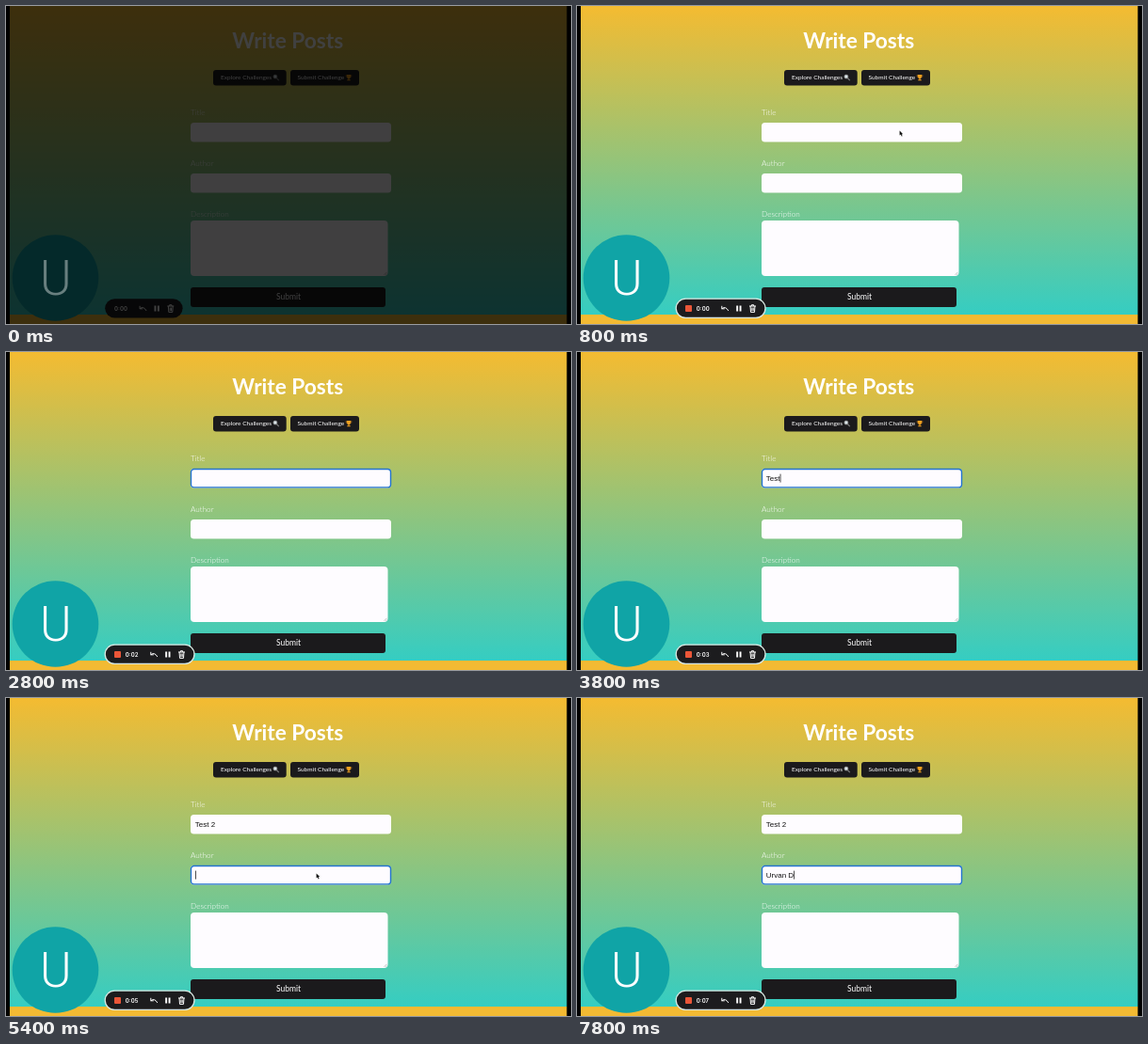
An HTML page for the animation above (8000 ms loop, 600 px wide and 338 px high).

```html
<!DOCTYPE html>
<html lang="en">
<head>
<meta charset="utf-8">
<title>Write Posts</title>
<style>
  html, body { margin: 0; width: 100%; height: 100%; overflow: hidden; background: #000; }
  svg { display: block; width: 100vw; height: 100vh; }
  text { font-family: Lato, sans-serif; fill: #fff; }
  .heading { font-size: 22.7px; font-weight: 700; text-anchor: middle; }
  .label { font-size: 8.2px; font-weight: 300; }
  .link { font-size: 6.5px; }
  .submit { font-size: 8.5px; text-anchor: middle; }
  .initial { font: 300 51px Roboto, sans-serif; text-anchor: middle; }
  .timer { font: 600 6px Inter, sans-serif; }
  .typed { font: 8px "Liberation Sans", Arial, sans-serif; fill: #111; white-space: pre; }
  .button { fill: #1b1a1c; }
  .field { fill: #fefcff; }
  .ring { fill: none; stroke: #2272cf; stroke-width: 1.4; }
  .line { fill: none; stroke: #fff; stroke-width: 1; stroke-linecap: round; stroke-linejoin: round; }
</style>
</head>
<body>
<svg viewBox="0 0 600 338" preserveAspectRatio="none">
  <defs>
    <linearGradient id="sky" x2="0" y2="1">
      <stop stop-color="#f4bb31"/>
      <stop offset="1" stop-color="#35cdc2"/>
    </linearGradient>
  </defs>
  <rect width="600" height="338"/>
  <rect x="4" width="591.5" height="328" fill="url(#sky)"/>
  <rect x="4" y="328" width="591.5" height="10" fill="#f3ba33"/>

  <text class="heading" x="299.3" y="45">Write Posts</text>

  <rect class="button" x="220" y="68" width="77.7" height="16.5" rx="3"/>
  <text class="link" x="228" y="78.3">Explore Challenges</text>
  <path d="M287.3 76.5l2.5 2.6" stroke="#777" stroke-width="1.3"/>
  <circle cx="285.9" cy="75.1" r="2" fill="#dce6ea" stroke="#8d8d8d" stroke-width=".7"/>

  <rect class="button" x="302" y="68" width="73" height="16.5" rx="3"/>
  <text class="link" x="309.5" y="78.3">Submit Challenge</text>
  <path d="M362 73h4v2q0 1.8-1.5 2.2v1h1.2v1h-3.4v-1h1.2v-1q-1.5-.4-1.5-2.2z" fill="#f0a020"/>
  <path d="M362 73.7h-1q0 2 1.5 2.2M366 73.7h1q0 2-1.5 2.2" fill="none" stroke="#d98a1c" stroke-width=".6"/>

  <text class="label" x="196" y="116.3">Title</text>
  <text class="label" x="196" y="170.3">Author</text>
  <text class="label" x="196" y="224.3">Description</text>

  <g id="title" transform="translate(196 124)"></g>
  <g id="author" transform="translate(196 178)"></g>

  <rect class="field" x="196" y="228" width="209.5" height="59" rx="4"/>
  <path d="M401.5 285.8l3-3M403.3 285.8l1.2-1.2" stroke="#888" stroke-width=".5"/>

  <rect class="button" x="196" y="299" width="207" height="21" rx="3"/>
  <text class="submit" x="300" y="312.4">Submit</text>

  <circle cx="52.5" cy="289" r="45.8" fill="#10a4a6"/>

  <rect id="bar" x="105.2" y="311.2" height="20.2" rx="10.1" fill="#1c1c1e" stroke="#d9e8e2"/>
  <rect id="record" x="115" y="318" width="7" height="7" rx="1" fill="#ea5638"/>
  <g id="tools">
    <text class="timer" id="timer" x="126.8" y="323.8"></text>
    <path class="line" d="M153.8 319.2v2.6h2.6M154 321.6q3.5-3.2 6.6 2"/>
    <path d="M169.2 318.6h1.9v6h-1.9zM172.6 318.6h1.9v6h-1.9z" fill="#fff"/>
    <path class="line" d="M183.4 319h6.2M185.4 318.6v-.9h2.2v.9M184.1 319.2l.4 6.2h4l.4-6.2M185.9 321v2.7M187.2 321v2.7" stroke-width=".9"/>
  </g>

  <rect id="shade" width="600" height="338" opacity=".75"/>
  <text class="initial" id="initial" x="52.8" y="307">U</text>
  <path id="pointer" d="M0 0v5l1.2-1 .9 2 .9-.4-.9-1.9h1.5z" fill="#111" stroke="#fff" stroke-width=".6" paint-order="stroke"/>
</svg>
<script>
const LOOP = 8000, STEP = 200, BRIGHT_AT = 800;
const $ = id => document.getElementById(id);
const show = (el, on) => el.setAttribute("visibility", on ? "visible" : "hidden");

// Each key time reveals one more character.
const fields = [
  { id: "title", text: "Test 2", focus: 2000, blur: 5400, keys: [3000, 3200, 3400, 3600, 4000, 4400] },
  { id: "author", text: "Urvan D", focus: 5400, blur: LOOP, keys: [6000, 6200, 6400, 6600, 6800, 7000, 7400] }
];

for (const field of fields) {
  const group = $(field.id);
  group.innerHTML = `
    <rect class="field" width="213" height="20.4" rx="3.5"/>
    <rect class="ring" x=".5" y=".5" width="212" height="19.4" rx="3.2"/>
    <text class="typed" x="4.8" y="13"></text>
    <rect class="caret" y="5.6" width=".7" height="9"/>`;
  field.ring = group.querySelector(".ring");
  field.typed = group.querySelector(".typed");
  field.caret = group.querySelector(".caret");
}

function drawField(field, t) {
  const pressed = field.keys.filter(key => key <= t);
  const focused = t >= field.focus && t < field.blur;
  const lastEvent = pressed.length ? pressed[pressed.length - 1] : field.focus;
  const caretOn = focused && Math.floor((t - lastEvent) / 500) % 2 === 0;
  field.typed.textContent = field.text.slice(0, pressed.length);
  const width = pressed.length ? field.typed.getComputedTextLength() : 0;
  field.caret.setAttribute("x", 5 + width);
  show(field.ring, focused);
  show(field.caret, caretOn);
}

// Pointer stops: time, x, y
const stops = [[0, 342.6, 132.6], [4400, 342.6, 132.6], [4800, 330.7, 177.5], [5200, 329.6, 186.4], [LOOP, 329.6, 186.4]];

function drawPointer(t) {
  const i = stops.findIndex(stop => stop[0] > t);
  const [t0, x0, y0] = stops[i - 1], [t1, x1, y1] = stops[i];
  const k = (t - t0) / (t1 - t0);
  $("pointer").setAttribute("transform", `translate(${x0 + (x1 - x0) * k} ${y0 + (y1 - y0) * k})`);
  show($("pointer"), (t >= 200 && t < 2600) || (t >= 4400 && t < 6400));
}

function frame() {
  const t = Math.floor(performance.now() % LOOP / STEP) * STEP;
  const bright = t >= BRIGHT_AT;
  show($("shade"), !bright);
  show($("record"), bright);
  $("initial").setAttribute("opacity", bright ? 1 : .4);
  $("bar").setAttribute("width", bright ? 94.8 : 82.4);
  $("bar").setAttribute("stroke-width", bright ? 1.3 : 0);
  $("tools").setAttribute("transform", `translate(${bright ? 0 : -11.7})`);
  $("timer").textContent = "0:0" + Math.floor(t / 1000);
  fields.forEach(field => drawField(field, t));
  drawPointer(t);
  requestAnimationFrame(frame);
}
frame();
</script>
</body>
</html>
```
